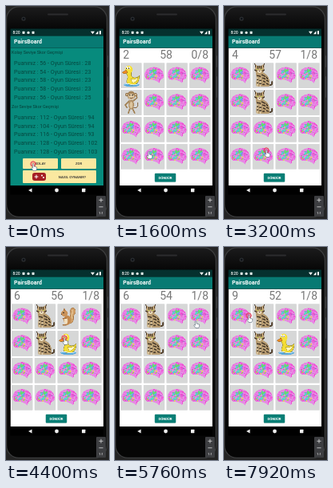
These frames come from a looping animation (129 px wide and 267 px high, 8000 ms). An HTML page with a canvas:

```html
<!DOCTYPE html>
<html lang="tr">
<head>
<meta charset="utf-8">
<title>PairsBoard</title>
<style>
html, body { margin: 0; width: 100%; height: 100%; overflow: hidden; background: #242424; }
canvas { display: block; width: 129px; height: 267px; }
</style>
</head>
<body>
<canvas id="stage"></canvas>
<script>
const W = 129, H = 267, LOOP = 8000;
const canvas = document.getElementById('stage');
const dpr = Math.max(1, window.devicePixelRatio || 1);
canvas.width = W * dpr;
canvas.height = H * dpr;
let g = canvas.getContext('2d');

const TEAL = '#087a73', STATUS = '#05302e', YELLOW = '#fae8a0';
const SCREEN = { x: 5.5, y: 28.5, w: 116.5, top: 52.5, bottom: 225 };

// Drawing helpers
function rect(x, y, w, h, fill, r = 0) {
  g.fillStyle = fill;
  g.beginPath();
  g.roundRect(x, y, w, h, r);
  g.fill();
}
function oval(x, y, rx, ry, fill, turn = 0) {
  g.fillStyle = fill;
  g.beginPath();
  g.ellipse(x, y, rx, ry, turn, 0, Math.PI * 2);
  g.fill();
}
function shape(path, fill, stroke, width = 0.6) {
  const p = new Path2D(path);
  if (fill) { g.fillStyle = fill; g.fill(p); }
  if (stroke) {
    g.strokeStyle = stroke;
    g.lineWidth = width;
    g.lineCap = g.lineJoin = 'round';
    g.stroke(p);
  }
}
function text(str, x, y, size, fill, align = 'left', weight = 400) {
  g.font = `${weight} ${size}px Roboto, sans-serif`;
  g.textAlign = align;
  g.textBaseline = 'middle';
  g.fillStyle = fill;
  g.fillText(str, x, y);
}
function at(x, y, draw) {
  g.save();
  g.translate(x, y);
  draw();
  g.restore();
}
function body(fill, r = 0) {
  rect(SCREEN.x, SCREEN.top, SCREEN.w, SCREEN.bottom - SCREEN.top, fill, r);
}

// Card pictures, each in a box of 27 by 31
const BRAIN = 'M1.5 16C1 10 6 5.5 12 5.5C19 4.5 25 9 25.5 15C26 19 24 21 21.5 21L20 25.5L17 23C14 22 12 21 9 21C5 22 2 20 1.5 16Z';
const PINK = ['#f06be2', '#e88ae8', '#ee4fd0'];
const COOL = ['#4fd8e0', '#66dd6a', '#8a86ea'];
const WARM = ['#e9e04a', '#a5dc50', '#58d6d0'];

function paintBrain() {
  let seed = 11;
  const rnd = () => (seed = seed * 16807 % 2147483647) / 2147483647;
  g.save();
  g.clip(new Path2D(BRAIN));
  rect(0, 0, 27, 31, '#e58be0');
  for (let i = 0; i < 150; i++) {
    const x = 1 + rnd() * 25, y = 5 + rnd() * 20;
    const near = Math.hypot((x - 11) / 8, (y - 14) / 8) + rnd() * 0.5;
    const hues = near > 1.1 ? PINK : y > 14 ? WARM : COOL;
    oval(x, y, 0.8 + rnd() * 1.1, 0.7 + rnd() * 0.4, hues[Math.floor(rnd() * 3)], rnd() * 3);
  }
  g.restore();
  shape('M4 15C8 11 10 17 15 14S21 15 24 13M8 20Q13 16 20 20', null, '#9a6fc0', 0.4);
}

function paintDuck() {
  oval(14, 27.5, 10, 2.6, '#58a8dc');
  shape('M7 13Q10 17 9 19Q5 27 14 28Q24 28 24 16Q20 20 15 18Q13 16 14 12Z', '#f3dc35', '#8d8230', 0.5);
  oval(10.5, 8.5, 4.8, 5, '#f6e03a');
  shape('M7 9L2 12Q4 15 9 12Z', '#ef8d25', '#8c5517', 0.4);
  for (const x of [8, 11]) {
    oval(x, 6.5, 1.3, 1.8, '#fff');
    oval(x - 0.2, 7, 0.5, 0.8, '#222');
  }
  shape('M13 20Q18 22 22 18Q21 25 15 25Z', '#fff7bd', '#b09c30', 0.5);
  shape('M5 27Q9 25.5 13 27T23 26.5', null, '#d8f0fa', 0.9);
}

function paintMonkey() {
  shape('M16 22Q23 24 22 16', null, '#8a6a44', 0.9);
  shape('M11 14L6 19L8 22M16 14L21 10L20 6M12 23L10 29M15 23L18 29', null, '#a3845a', 1.8);
  oval(13.5, 18.5, 3.6, 6, '#b3946a');
  oval(13.5, 19, 2, 4, '#dcc49c');
  for (const x of [8, 19]) {
    oval(x, 6, 2, 2.2, '#8f6f48');
    oval(x, 6, 1, 1.2, '#dcc49c');
  }
  oval(13.5, 7, 5, 5.5, '#a3845a');
  oval(13.5, 8.5, 3.8, 3.8, '#e2cba6');
  for (const x of [11.8, 15.2]) oval(x, 6.5, 0.7, 0.9, '#222');
  shape('M11 9.5Q13.5 11.5 16 9.5', null, '#6b472c');
}

function paintCat() {
  shape('M18 28Q26 29 25 24', null, '#54432f', 2);
  shape('M4 12C8 13 12 11 15 13C21 16 23 23 21 30H5C4 24 6 18 4 12Z', '#b59a70');
  shape('M3 1L6 4H11L15 1L15 9Q14 14 9 14Q3 13 3 8Z', '#b99c70');
  shape('M6 19V29M10 20V29', null, '#dcc8a2', 1.8);
  shape('M12 15L16 17M18 18L19 20M13 19L16 20M18 22L20 23M14 23L16 24M18 26L20 27M13 27H15M6 16L10 17M6 21H7M9 22H11M6 25H7M9 26H11M7 4V7M9 4V6M11 4V7M3 9L5 10M15 9L13 10', null, '#33291f', 1.2);
  shape('M3 1L4 5M15 1L14 5', null, '#443528', 0.9);
  oval(9, 11, 2.6, 1.9, '#e6d8ba');
  oval(6.6, 8.2, 1, 0.8, '#c5cf58');
  oval(11.4, 8.2, 1, 0.8, '#c5cf58');
  oval(9, 10.3, 0.7, 0.6, '#543030');
}

function paintSquirrel() {
  shape('M15 25C24 23 18 17 22 13C25 8 21 3 17.5 6C15 9 18 12 16 16Z', '#cf9d66', '#a0713c', 0.5);
  shape('M19 8C21 10 17 13 19 18', null, '#e6c796', 1.3);
  oval(12.5, 20.5, 4.5, 6, '#c4894f');
  oval(10.8, 21.5, 2.4, 4, '#f0dfbf');
  shape('M7.5 9L8.5 5L11 9Z', '#a8713c');
  oval(9, 12, 4.2, 3.8, '#c9925a');
  oval(7.8, 11.2, 0.7, 0.8, '#222');
  oval(5, 13, 0.6, 0.5, '#432a1c');
  shape('M11 18L7 18.5M11 26.5H7', null, '#a8713c', 1.5);
}

function paintPanda() {
  for (const x of [5.5, 21.5]) oval(x, 4, 3.2, 3.2, '#151515');
  oval(13.5, 23, 9.5, 7.5, '#151515');
  oval(13.5, 24, 5.5, 5.5, '#f8f8f8');
  oval(13.5, 10, 9.3, 8, '#fff');
  oval(9.5, 10, 2.4, 3, '#151515', 0.5);
  oval(17.5, 10, 2.4, 3, '#151515', -0.5);
  for (const x of [9.8, 17.2]) oval(x, 9.6, 0.8, 0.9, '#fff');
  oval(13.5, 13.5, 1.4, 0.9, '#222');
  for (const x of [6, 21]) oval(x, 27.5, 3.3, 2.8, '#151515');
  shape('M12 26L22 18', null, '#52a747', 1.6);
  shape('M18 21Q18 15 24 17ZM19 21Q24 20 24 25Z', '#64bd4c');
}

const PAINT = { duck: paintDuck, monkey: paintMonkey, cat: paintCat, squirrel: paintSquirrel, panda: paintPanda };

function sprite(paint) {
  const c = document.createElement('canvas');
  const scale = dpr * 3;
  c.width = 27 * scale;
  c.height = 31 * scale;
  const main = g;
  g = c.getContext('2d');
  g.scale(scale, scale);
  paint();
  g = main;
  return c;
}
const brain = sprite(paintBrain);
const animals = {};
for (const name in PAINT) animals[name] = sprite(PAINT[name]);

// Column, row, picture, turned up, turned back
const FLIPS = [
  [0, 0, 'duck', 880, 1920],
  [0, 1, 'monkey', 1280, 1920],
  [1, 0, 'cat', 2400, LOOP],
  [1, 1, 'cat', 2800, LOOP],
  [2, 0, 'squirrel', 3920, 5200],
  [2, 1, 'duck', 4240, 5200],
  [3, 0, 'panda', 5840, 7040],
  [3, 1, 'monkey', 6320, 7040],
  [2, 1, 'duck', 7520, LOOP]
];
const CLICKS = [0, 880, 1280, 1880, 2400, 2800, 3180, 3640, 3920, 4240, 5160, 5840, 6320, 7000, 7520, 7900];
const PRESSES = [1880, 3640, 5160, 7000];

// Time, x, y
const MOVES = [
  [0, 34, 198], [240, 34, 198], [720, 22, 85], [900, 22, 85], [1120, 22, 119], [1320, 24, 122],
  [1600, 42, 183], [1780, 61, 214], [1940, 61, 214], [2300, 48, 89], [2480, 48, 89],
  [2700, 48, 121], [2880, 48, 122], [3200, 53, 181], [3520, 58, 201], [3600, 61, 213],
  [3680, 61, 213], [3880, 77, 88], [4000, 77, 88], [4200, 73, 114], [4440, 73, 114],
  [5040, 61, 214], [5240, 61, 214], [5680, 101, 93], [5900, 101, 93], [6240, 105, 120],
  [6400, 105, 120], [6880, 60, 213], [7080, 60, 213], [7400, 76, 120], [7580, 76, 120],
  [7840, 31, 86], [8000, 31, 86]
];

const EASY = [[56, 28], [54, 23], [58, 23], [58, 23], [56, 25]];
const HARD = [[112, 94], [104, 94], [116, 93], [128, 102], [128, 103]];

function scores(title, rows, y, bottom) {
  text(title, 7, y, 5.5, '#073f39');
  g.save();
  g.beginPath();
  g.rect(6, y + 4, 114, bottom - y - 4);
  g.clip();
  rows.forEach(([points, secs], i) =>
    text(`Puanınız : ${points} - Oyun Süresi : ${secs}`, 10, y + 14 + i * 10.7, 7.1, '#064840'));
  g.restore();
}

function menu() {
  body('#078b7d');
  scores('Kolay Seviye Skor Geçmişi', EASY, 58, 118);
  scores('Zor Seviye Skor Geçmişi', HARD, 126, 187);
  rect(21, 191, 44, 13, YELLOW, 1);
  rect(69, 191, 44, 13, YELLOW, 1);
  rect(21, 206, 92, 16, YELLOW, 1);
  text('KOLAY', 43, 198, 4.3, '#333', 'center', 500);
  text('ZOR', 91, 198, 4.3, '#333', 'center', 500);
  text('NASIL OYNANIR?', 83, 214.3, 4.4, '#333', 'center', 500);
  rect(33, 209, 17, 10, '#a51e23', 3);
  shape('M36 214H40M38 212V216', null, '#fff', 1);
  oval(45, 212.5, 1, 1, '#fff');
  oval(47, 215, 1, 1, '#fff');
}

function game(t) {
  body('#fff');
  const moves = FLIPS.filter(f => f[3] <= t).length;
  const left = 59 - Math.max(0, Math.floor((t - 520) / 1000));
  text(moves, 10, 62.3, 14, '#777');
  text(left, 64, 62.3, 14, '#777', 'center');
  text(t < 2880 ? '0/8' : '1/8', 117, 62.3, 14, '#777', 'right');
  for (let row = 0; row < 4; row++) {
    for (let col = 0; col < 4; col++) {
      const x = 7 + col * 28.7, y = 71.2 + row * 33.9;
      const up = FLIPS.find(f => f[0] === col && f[1] === row && f[3] <= t && t < f[4]);
      rect(x, y, 26.5, 31.8, '#d6d7d7', 0.7);
      g.drawImage(up ? animals[up[2]] : brain, x, y, 26.5, 31);
    }
  }
  const pressed = PRESSES.some(p => t >= p && t < p + 240);
  rect(49.8, 210.4, 26.4, 10.6, '#c9d4d2', 1);
  rect(49.8, 209.8, 26.4, 10.6, pressed ? '#3a9c91' : '#087e75', 1);
  text('DÖNDÜR', 63, 215.4, 4.3, '#fff', 'center', 700);
}

function phone() {
  rect(0, 0, W, H, '#242424');
  rect(125, 62, 3, 15, '#3a3a3c', 1);
  rect(125, 88, 3, 27, '#3a3a3c', 1);
  rect(0, 0.3, 127, 264.7, '#3c3d3e', 16);
  const shade = g.createLinearGradient(0, 0, 0, 30);
  shade.addColorStop(0, '#1c1c1d');
  shade.addColorStop(1, '#060606');
  rect(1.2, 1.5, 124.6, 262.3, shade, 15);
  rect(52, 9.5, 26, 2, '#2c2c2e', 1);
  oval(22, 16, 2.6, 2.6, '#2b2d30');
  oval(22, 16, 1.3, 1.3, '#0c1016');
  rect(SCREEN.x, SCREEN.y, SCREEN.w, 208, '#000');
}

function bars() {
  rect(SCREEN.x, SCREEN.y, SCREEN.w, 9, STATUS);
  text('8:20', 8.5, 33.6, 4.6, '#fff', 'left', 500);
  rect(20.5, 31.7, 3, 3.4, '#dde8e6', 0.5);
  oval(28, 33.4, 1.7, 1.7, '#dde8e6');
  rect(32.5, 31.7, 3, 3.4, '#dde8e6', 0.5);
  shape('M106 31.8H111L108.5 35.3ZM112 35.3L115.5 31.3V35.3Z', '#fff');
  rect(117, 31.1, 2, 4.4, '#fff', 0.4);
  rect(SCREEN.x, 37.5, SCREEN.w, 15, TEAL);
  text('PairsBoard', 10, 45.3, 7, '#fff', 'left', 700);
}

function navigation() {
  rect(SCREEN.x, SCREEN.bottom, SCREEN.w, 11, '#000');
  shape('M32.5 228.5V233.5L28 231Z', '#eee');
  oval(63.5, 231, 2.4, 2.4, '#eee');
  rect(95, 228.8, 4.4, 4.4, '#eee', 0.4);
}

function zoomPanel() {
  rect(113, 238, 12, 26, '#3d3e41', 1);
  shape('M116.8 243.3H121.2M119 241.1V245.5M116.8 251.8H121.2', null, '#ddd', 0.8);
  text('1:1', 119, 259.5, 4, '#ddd', 'center', 500);
}

function pointer(t) {
  let i = 0;
  while (i < MOVES.length - 2 && t >= MOVES[i + 1][0]) i++;
  const [t0, x0, y0] = MOVES[i], [t1, x1, y1] = MOVES[i + 1];
  const k = (t - t0) / (t1 - t0), e = k * k * (3 - 2 * k);
  at(x0 + (x1 - x0) * e, y0 + (y1 - y0) * e, () => {
    if (CLICKS.some(c => t >= c && t < c + 180)) {
      oval(0, 0, 3.2, 3.2, 'rgba(239,75,100,.35)');
      g.strokeStyle = '#e43b57';
      g.lineWidth = 1;
      g.stroke();
    }
    shape('M-.6 0Q.2 -1 1 0V3L4.6 4V6.5L3.6 8.5H0L-2.2 5.2L-1.6 4.4L-.6 5Z', '#fff', '#33465c', 0.5);
  });
}

function draw(t) {
  g.setTransform(dpr, 0, 0, dpr, 0, 0);
  phone();
  const open = Math.min(1, Math.max(0, (t - 400) / 160));
  if (open < 1) menu();
  if (open > 0) {
    g.save();
    g.beginPath();
    g.rect(SCREEN.x, SCREEN.top, SCREEN.w, SCREEN.bottom - SCREEN.top);
    g.clip();
    g.globalAlpha = open;
    g.translate(0, 14 * (1 - open) ** 2);
    game(t);
    g.restore();
  }
  bars();
  navigation();
  zoomPanel();
  pointer(t);
}

const start = performance.now();
function frame() {
  draw((performance.now() - start) % LOOP);
  requestAnimationFrame(frame);
}
frame();
</script>
</body>
</html>
```
